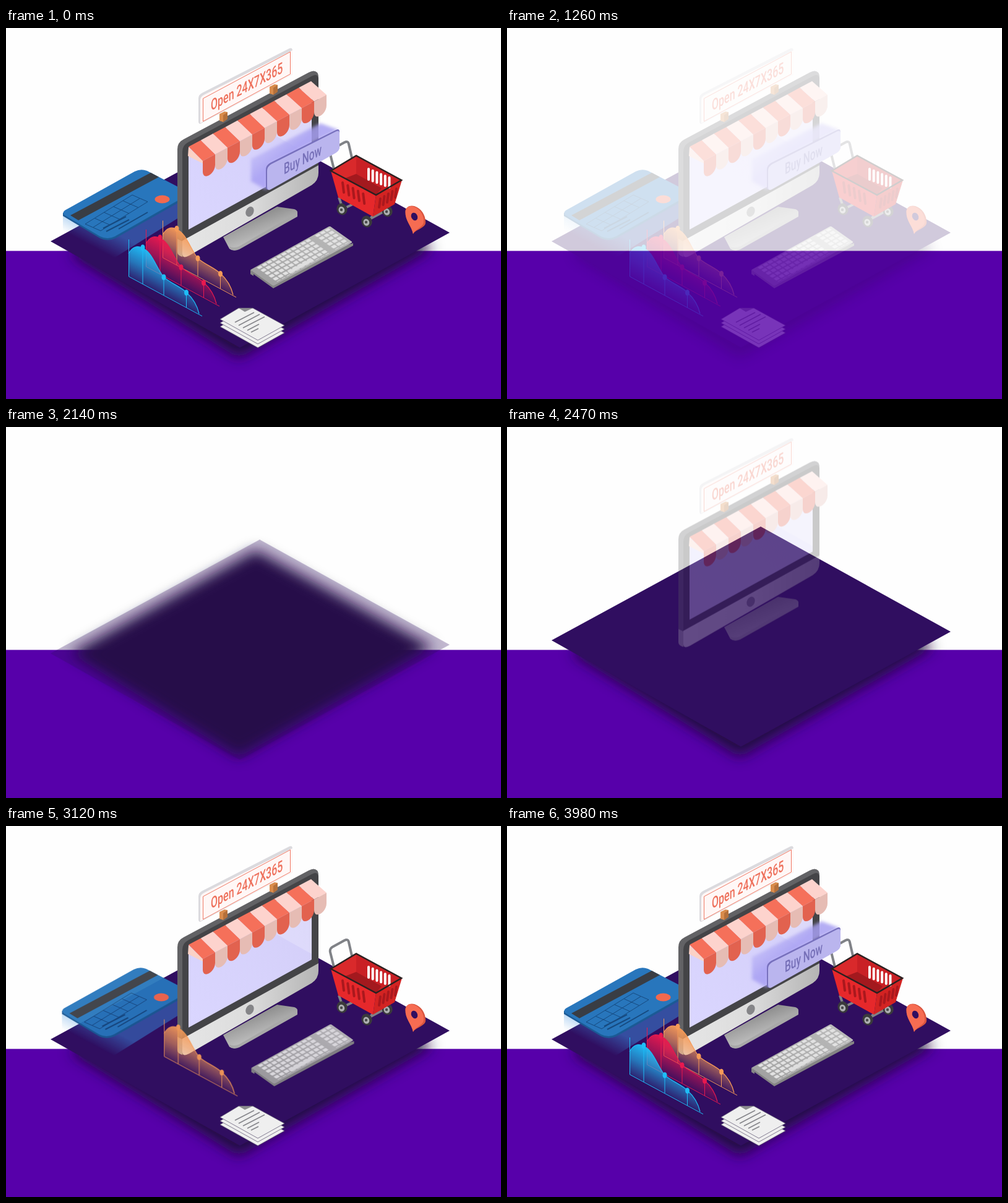
An HTML page that plays this animation: 800 px wide and 600 px high, repeating every 4.18 s.

```html
<!DOCTYPE html>
<html lang="en">
<head>
<meta charset="utf-8">
<title>Online store</title>
<style>
html, body { margin: 0; width: 100%; height: 100%; overflow: hidden; background: #fefefe; }
svg { display: block; width: 100vw; height: 100vh; }
text { font: 500 25px Roboto, sans-serif; }
.anim { animation: 4180ms linear infinite; }
#scene { animation-name: scene; }
#shadow { animation-name: shadow; }
#mat { animation-name: mat; --from: translate(0, 30px); }
#monitor { animation-name: monitor; --from: translate(0, -20px); }
.early { animation-name: early; --from: translate(30px, 0); }
.late { animation-name: late; --from: translate(30px, 0); }
#papers { --from: translate(0, 0); }
#card { --from: translate(-30px, 0); }
#orange { --from: translate(45px, 25px); color: #f59a58; }
#button { animation-name: button; --from: translate(-22px, -12px); }
#red { animation-name: red; --from: translate(105px, 60px); color: #e8194f; }
#blue { animation-name: blue; --from: translate(62px, 35px); color: #1fbdf6; }
@keyframes scene { 19.9% { opacity: 1 } 33%, 34.2% { opacity: 0 } 34.21% { opacity: 1 } }
@keyframes shadow { 34% { opacity: 1 } 34.01%, 36.6% { opacity: 0 } 42% { opacity: .7 } 47% { opacity: 1 } }
@keyframes mat { 34% { opacity: 1; transform: none } 34.01%, 48.6% { opacity: 0; transform: var(--from) } 57.4% { opacity: 1; transform: none } }
@keyframes monitor { 34% { opacity: 1; transform: none } 34.01%, 56.7% { opacity: 0; transform: var(--from) } 65.3% { opacity: 1; transform: none } }
@keyframes early { 34% { opacity: 1; transform: none } 34.01%, 64.4% { opacity: 0; transform: var(--from) } 73% { opacity: 1; transform: none } }
@keyframes late { 34% { opacity: 1; transform: none } 34.01%, 66.5% { opacity: 0; transform: var(--from) } 75.1% { opacity: 1; transform: none } }
@keyframes button { 34% { opacity: 1; transform: none } 34.01%, 76.3% { opacity: 0; transform: var(--from) } 83.3% { opacity: 1; transform: none } }
@keyframes red { 34% { opacity: 1; transform: none } 34.01%, 82.3% { opacity: 0; transform: var(--from) } 89.2% { opacity: 1; transform: none } }
@keyframes blue { 34% { opacity: 1; transform: none } 34.01%, 89.5% { opacity: 0; transform: var(--from) } 95.2% { opacity: 1; transform: none } }
</style>
</head>
<body>
<svg viewBox="0 0 800 600" preserveAspectRatio="none">
<defs>
  <filter id="soft" x="-10%" y="-15%" width="120%" height="130%"><feGaussianBlur stdDeviation="11"/></filter>
  <filter id="haze" x="-10%" y="-10%" width="120%" height="120%"><feGaussianBlur stdDeviation="2.5"/></filter>
  <linearGradient id="chin"><stop stop-color="#e6e6e6"/><stop offset=".5" stop-color="#dcdcdc"/><stop offset="1" stop-color="#b4b4b4"/></linearGradient>
  <linearGradient id="foot" x1="0" y1=".2" x2=".5" y2="1"><stop stop-color="#777"/><stop offset=".5" stop-color="#a6a6a6"/><stop offset="1" stop-color="#cfcfcf"/></linearGradient>
  <linearGradient id="glass" x1="0" y1="1" x2="1" y2="0"><stop stop-color="#dad6ff"/><stop offset="1" stop-color="#d3cef8"/></linearGradient>
  <linearGradient id="keys"><stop stop-color="#a2a2a2"/><stop offset="1" stop-color="#b9b9b9"/></linearGradient>
  <linearGradient id="glow" gradientUnits="userSpaceOnUse" x1="400" y1="165" x2="440" y2="215"><stop stop-color="#b5aff5" stop-opacity=".1"/><stop offset="1" stop-color="#a79ff2" stop-opacity=".85"/></linearGradient>
  <linearGradient id="beam" gradientUnits="userSpaceOnUse" x1="150" y1="318" x2="133" y2="350"><stop stop-color="#3a8ee0" stop-opacity=".5"/><stop offset="1" stop-color="#3a8ee0" stop-opacity="0"/></linearGradient>
  <linearGradient id="fade" gradientUnits="userSpaceOnUse" x1="278" y1="388" x2="255" y2="432"><stop stop-color="#fff" stop-opacity=".95"/><stop offset=".5" stop-color="#fff" stop-opacity=".6"/><stop offset="1" stop-color="#fff" stop-opacity=".12"/></linearGradient>
  <mask id="fading" maskUnits="userSpaceOnUse" x="190" y="330" width="140" height="150"><path d="M190 330h140v150h-140z" fill="url(#fade)"/></mask>
  <pattern id="key" width="8" height="8" patternUnits="userSpaceOnUse"><rect x=".8" y="1" width="6.2" height="5.6" rx="1" fill="#e2e2e2"/></pattern>
  <g id="chart">
    <path d="M198 365C204 354 212 351 221 356C236 362 243 388 255 403C268 414 282 418 292 428C302 437 309 449 312 462L198 402Z" fill="currentColor" mask="url(#fading)"/>
    <g fill="none" stroke="currentColor">
      <path d="M198 365C204 354 212 351 221 356C236 362 243 388 255 403C268 414 282 418 292 428C302 437 309 449 312 462" stroke-width="1.2"/>
      <path d="M198.5 342V402L317 466M221 356V414M255 403V432M291.500 428V452"/>
    </g>
    <g fill="currentColor"><ellipse cx="221" cy="355" rx="3.5" ry="4.8"/><ellipse cx="255" cy="403" rx="3.500" ry="4.8"/><ellipse cx="291.500" cy="428" rx="3.500" ry="4.8"/></g>
  </g>
  <g id="post">
    <path d="M0 4L8 0L13 1V12L6 17L0 15Z" fill="#d98b4b"/>
    <path d="M6 6L13 1V12L6 17Z" fill="#b5703a"/>
  </g>
  <g id="wheel">
    <ellipse rx="8.5" ry="9.5" transform="rotate(-20)" fill="#3a3a3c"/>
    <ellipse cx="-1" cy="1" rx="4.800" ry="5.600" transform="rotate(-20)" fill="#aeb0b2"/>
    <circle cx="-1" cy="1" r="2.200" fill="#4a4a4c"/>
  </g>
</defs>

<path d="M0 0H800V360.500H0Z" fill="#fefefe"/>
<path d="M0 360.500H800V600H0Z" fill="#5700aa"/>

<g id="scene" class="anim">
  <path id="shadow" class="anim" d="M404 199L690 356L376 534L104 366Z" fill="#210f40" filter="url(#soft)"/>
  <path id="mat" class="anim" d="M72 345L410 161L717 331L378 517Z" fill="#300e60"/>

  <g id="card" class="anim late">
    <path d="M92 300L160 342L290 274V300L165 378L92 335Z" fill="url(#beam)"/>
    <path d="M92 299V304L152 340Q164 346 177 340L283 280V270Z" fill="#1b5a95"/>
    <path d="M95 295L208 232Q218 227 228 231L284 260Q292 266 283 276L176 337Q164 343 152 337L95 303Q90 299 95 295Z" fill="#2876bc"/>
    <path d="M104 303L234 234L247 241L117 311Z" fill="#393d44"/>
    <g fill="none" stroke="#164a80">
      <path id="grid"/>
      <path d="M157 324L194 305M162 329L199 310M182 325L229 298" stroke-width="2"/>
    </g>
    <ellipse cx="252.500" cy="277" rx="12" ry="6.500" fill="#f2694e"/>
  </g>

  <g id="monitor" class="anim">
    <path d="M351 338L438 289L466 293Q471 295 471 298V304L377 357Q368 362 361 357Z" fill="url(#foot)"/>
    <path d="M470 299L377 353Q368 357 360 353L362 357Q368 362 377 358L471 305Z" fill="#a8a8a8"/>
    <path d="M277 362V196Q277 185 287 180L489 72Q498 67 503 72Q505 74 505 82V232Q505 247 494 254L296 368Q288 372 281 368Q277 366 277 362Z" fill="#626265"/>
    <path d="M285 345V200Q285 190 294 185L494 78Q505 72 505 84V223Z" fill="#444447"/>
    <path d="M277 341L285 345V370Q277 368 277 362Z" fill="#b5b5b5"/>
    <path d="M285 344L505 222V234Q505 247 494 254L296 368Q285 374 285 365Z" fill="url(#chin)"/>
    <path d="M295 193L494 92V216L295 326Z" fill="url(#glass)"/>
    <path d="M410 160L494 115V207Z" fill="#fff" opacity=".2"/>
    <ellipse cx="394" cy="297" rx="6.300" ry="8.500" transform="rotate(24 394 297)" fill="#858588"/>
    <path d="M295 193L318 215V219L294 207Z" fill="#fbd2c6"/>
    <g id="awning"></g>
    <path d="M311 114Q311 108 317 105L458 33Q463 31 463 37V75L314 155Q311 155 311 151Z" fill="#dbdade"/>
    <path d="M314 117Q314 111 320 108L463 36V75L314 154Z" fill="#fff7f6"/>
    <path d="M318.500 114L459.500 38.500V74.500L318.500 151Z" fill="none" stroke="#ef7a66"/>
    <text transform="matrix(.64 -.34 0 1 331 134)" fill="#ee705b">Open 24X7X365</text>
    <use href="#post" x="345" y="135"/>
    <use href="#post" x="426" y="91"/>
  </g>

  <g class="anim early">
    <g fill="none" stroke="#808287" stroke-width="4" stroke-linejoin="round">
      <path d="M530 228L524 204Q523 199 527 196L547 185Q553 182 554 188L559 210"/>
      <path d="M538 274L544 291M594 303L586 311M586 310L616 294L622 283M548 291L575 278"/>
    </g>
    <use href="#wheel" x="543" y="293"/>
    <use href="#wheel" x="583" y="313"/>
    <use href="#wheel" x="616" y="296"/>
    <path d="M525 231L566 206L640 246L598 270Z" fill="#c92025"/>
    <path d="M525 231L566 206V236L548 244Z" fill="#d9292b"/>
    <path d="M566 236L607 259L598 270L548 243Z" fill="#a3191e"/>
    <path d="M525 231L598 270L593 305L537 274Z" fill="#e6282b"/>
    <path d="M598 270L640 246L628 285L593 305Z" fill="#d32322"/>
    <g fill="none" stroke-width="4" stroke-linecap="round">
      <path id="backSlots" stroke="#fff"/>
      <path id="frontSlots" stroke="#aa181d"/>
    </g>
    <path d="M525 231L566 206.500L639 246L598 270Z" fill="none" stroke="#2b2020" stroke-width="2.500"/>
  </g>

  <g class="anim early">
    <path d="M658 333C655 319 645 312 645.500 297C646 289 653 286 660 288C672 292 679 304 678 316C676 324 662 326 658 333Z" fill="#d9553f"/>
    <path d="M658 333C655 319 645 312 645.500 297C646 289 653 287 659 289C670 293 676 304 675 315C673 323 661 325 658 333Z" fill="#f66c52"/>
    <ellipse cx="660" cy="305" rx="5" ry="6.500" transform="rotate(-25 660 305)" fill="#300e60"/>
  </g>

  <g id="keyboard" class="anim late">
    <path d="M395 391V398L400 401V398L432 421L561 352V348Z" fill="#858585"/>
    <g transform="matrix(.98 -.54 .82 .58 395 391)">
      <rect width="131" height="45" rx="2" fill="url(#keys)"/>
      <path d="M8 2H96V42H8ZM104 2H128V42H104Z" fill="url(#key)"/>
      <rect x="32" y="34.500" width="39" height="6" rx="1" fill="#dedede"/>
    </g>
  </g>

  <g id="papers" class="anim early">
    <g id="sheets" fill="#efefef" stroke="#69607a" stroke-width=".8"></g>
    <path d="M376 453H399L386 459Z" fill="#8b8b8e"/>
    <path d="M370 476L401 460M376 481L410 463M383 485L418 467M390 489L409 479M396 492L408 486" fill="none" stroke="#87878c" stroke-width="1.800"/>
  </g>

  <g id="button" class="anim">
    <path d="M396 212L508 154L538 165L426 220L421 262L396 248Z" fill="url(#glow)" filter="url(#haze)"/>
    <path d="M420 229Q420 222 427 218L533 165Q539 162 539 168V191Q539 198 533 201L428 260Q420 264 420 257Z" fill="#7770bd"/>
    <path d="M422 231Q422 224 429 220L534 167Q539 165 539 170V192Q539 198 533 202L428 261Q422 264 422 257Z" fill="#bab5ee"/>
    <text transform="matrix(.62 -.325 0 1 449 237)" fill="#7670b8">Buy Now</text>
  </g>

  <g id="orange" class="anim late"><use href="#chart" x="55" y="-30.500"/></g>
  <g id="red" class="anim"><use href="#chart" x="28" y="-16"/></g>
  <g id="blue" class="anim"><use href="#chart"/></g>
</g>
</svg>
<script>
const byId = id => document.getElementById(id);
const repeat = (count, draw) => Array.from({ length: count }, (_, i) => draw(i)).join('');

byId('awning').innerHTML = repeat(10, i => {
  const [top, hem] = i % 2 ? ['#fdd3cd', '#e6bcb4'] : ['#f5705a', '#e2624f'];
  const back = n => `${295 + 19.8 * n} ${192 - 10.6 * n}`;
  const x = 318 + 20 * i, y = 215 - 10.7 * i;
  const right = x + 20, rightY = y - 10.7;
  return `<path fill="${top}" d="M${back(i)}L${back(i + 1)}L${right} ${rightY}L${x} ${y}Z"/>
    <path fill="${hem}" d="M${x} ${y}L${right} ${rightY}V${rightY + 17}C${right} ${rightY + 32} ${x} ${y + 33} ${x} ${y + 17}Z"/>`;
});

byId('sheets').innerHTML = repeat(3, i =>
  `<path transform="translate(0 ${12 - 6 * i})" d="M346 471L376 453H399L450 481L407 505Z"/>`);

byId('grid').setAttribute('d',
  repeat(3, i => `M${128 + 12.5 * i} ${317 + 5.5 * i}l76 -47`) +
  repeat(6, i => `M${128 + 15.2 * i} ${317 - 9.4 * i}l25 11`));

byId('backSlots').setAttribute('d', repeat(6, i => `M${586 + 6.7 * i} ${228 + 2.8 * i}v${17 - .3 * i}`));
byId('frontSlots').setAttribute('d',
  repeat(5, i => `M${544 + 8.3 * i} ${250 + 4.5 * i}l2 16`) +
  repeat(5, i => `M${605 + 6.5 * i} ${276 - 4 * i}l-2 14`));
</script>
</body>
</html>
```
